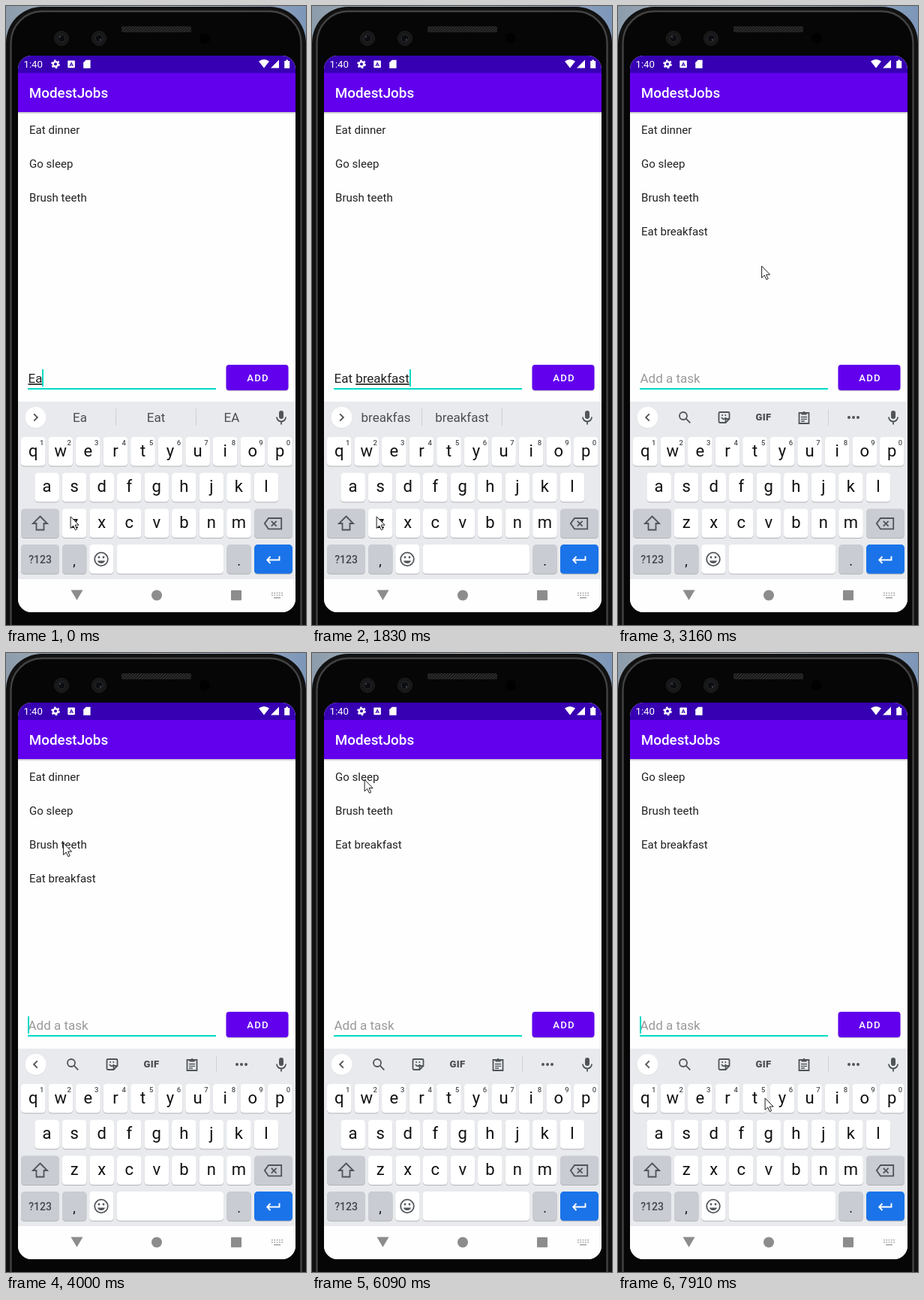
Animation of 400x823 px, one loop 8 s. Source, as an HTML page:

```html
<!DOCTYPE html>
<html lang="en">
<head>
<meta charset="utf-8">
<title>To-do list</title>
<style>
  html, body { margin: 0; width: 100%; height: 100%; overflow: hidden; background: #050505; }
  svg { display: block; width: 100vw; height: 100vh; }
  text { font-family: Roboto, sans-serif; white-space: pre; }
  .mid { text-anchor: middle; }
  .list text { font-size: 15.07px; fill: #212121; }
  .field { font-size: 17px; fill: #212121; }
  .word { text-decoration: underline #666; text-decoration-thickness: 1px; text-underline-offset: 2px; }
  .hint { fill: #9a9a9a; }
  .strip text { font-size: 17px; fill: #4a4d52; }
  .key { font-size: 22px; fill: #111; }
  .digit { font-size: 9.5px; fill: #4a4d52; font-weight: 500; }
  .line { fill: none; stroke: #505459; stroke-width: 1.8; }
</style>
</head>
<body>
<svg viewBox="0 0 400 823" preserveAspectRatio="none">
  <defs>
    <clipPath id="screen"><rect x="16" y="66" width="370" height="740" rx="18"/></clipPath>
    <linearGradient id="sky"><stop stop-color="#8d9cab"/><stop offset=".5" stop-color="#b9c3cc"/><stop offset="1" stop-color="#7d96b8"/></linearGradient>
    <linearGradient id="shade" x2="0" y2="1"><stop stop-color="#000" stop-opacity=".25"/><stop offset="1" stop-color="#000" stop-opacity="0"/></linearGradient>
    <pattern id="mesh" width="4" height="4" patternUnits="userSpaceOnUse"><rect width="4" height="4" fill="#1b1b1b"/><path d="M0 4L4 0" stroke="#383838"/></pattern>
  </defs>

  <!-- phone body -->
  <rect width="400" height="823" fill="url(#sky)"/>
  <rect x="0" y="1" width="400" height="900" rx="48" fill="#111"/>
  <rect x="6.5" y="7" width="387" height="900" rx="42" fill="#060606" stroke="#424242" stroke-width="2.4"/>
  <rect x="154" y="27" width="93" height="8" rx="2" fill="url(#mesh)"/>
  <g fill="#171717" stroke="#202020">
    <circle cx="74" cy="43" r="9.5"/><circle cx="124" cy="43" r="9.5"/>
  </g>
  <g fill="#0c0d11" stroke="#2a2c32">
    <circle cx="74" cy="43" r="5"/><circle cx="124" cy="43" r="5"/>
  </g>
  <g fill="#43464d"><circle cx="72" cy="41" r="1.2"/><circle cx="126" cy="45" r="1.2"/></g>
  <circle cx="265" cy="43" r="7" fill="#010101"/>

  <g clip-path="url(#screen)">
    <rect x="16" y="66" width="370" height="740" fill="#fefefe"/>
    <rect x="16" y="141" width="370" height="3" fill="url(#shade)"/>
    <rect x="16" y="66" width="370" height="23" fill="#3700b3"/>
    <rect x="16" y="89" width="370" height="52" fill="#6200ee"/>

    <!-- status bar -->
    <g fill="#fff">
      <text x="23.5" y="82" font-size="13.2">1:40</text>
      <circle cx="66" cy="77.3" r="3.2" fill="none" stroke="#fff" stroke-width="2.4"/>
      <circle cx="66" cy="77.3" r="5" fill="none" stroke="#fff" stroke-width="1.8" stroke-dasharray="2.6 2.636"/>
      <rect x="82.3" y="72.6" width="9.6" height="9.6" rx="1"/>
      <text class="mid" x="87.1" y="80.3" font-size="8" font-weight="700" fill="#3700b3">A</text>
      <path d="M106.6 71.8h6v11h-9.4v-7.6z"/>
      <path d="M337 73.6Q344 68.6 351 73.6L344 82.6ZM364 71.6V82.6H353ZM371.2 73h2.2v-1.5h2.6v1.5h2.2v9.8h-7z"/>
      <text x="30.7" y="122.3" font-size="18.84" font-weight="500">ModestJobs</text>
    </g>

    <g class="list" id="list"></g>

    <!-- entry row -->
    <rect x="29" y="508" width="251" height="2" fill="#03dac5"/>
    <text class="field" x="29.5" y="501"><tspan id="done"></tspan><tspan id="word" class="word"></tspan></text>
    <text class="field hint" id="hint" x="29.5" y="501">Add a task</text>
    <rect id="caret" y="483" width="2" height="23" fill="#03dac5"/>
    <rect x="293.5" y="478.3" width="83" height="34" rx="4" fill="#000" opacity=".18"/>
    <rect id="button" x="293.5" y="477" width="83" height="34" rx="4"/>
    <text class="mid" x="336" y="499.2" font-size="13.2" font-weight="500" letter-spacing="1.18" fill="#fff">ADD</text>

    <!-- keyboard -->
    <rect x="16" y="526" width="370" height="236" fill="#e8eaed"/>
    <circle cx="39.5" cy="547.5" r="14.2" fill="#000" opacity=".08"/>
    <circle cx="39.5" cy="547" r="14" fill="#fff"/>
    <path id="chevron" class="line" d="M-2.3 -4.7L2.4 0L-2.3 4.7"/>
    <rect x="364" y="538" width="6" height="11" rx="3" fill="#505459"/>
    <path class="line" d="M361 546.5a6 6 0 0 0 12 0M367 552.5v4"/>

    <g class="strip" id="words">
      <path d="M146.5 535V558M253.5 535V558" stroke="#cdd0d4"/>
      <text class="mid" x="98.5" y="553"></text>
      <text class="mid" x="200" y="553"></text>
      <text class="mid" x="301" y="553"></text>
    </g>
    <g class="strip" id="tools">
      <circle class="line" cx="87" cy="545" r="5"/>
      <path class="line" d="M90.7 548.7L96.3 554.3"/>
      <path class="line" d="M136 540h11a1.5 1.5 0 0 1 1.5 1.5V549l-5 5h-7.5a1.5 1.5 0 0 1-1.5-1.5v-11a1.5 1.5 0 0 1 1.5-1.5zM148 549h-4.5v4.5"/>
      <path class="line" d="M138 547q3 4.5 6 0M138.3 544h1.6M142.5 544h1.6"/>
      <text class="mid" x="194" y="551.4" style="font-size:13px;font-weight:900;letter-spacing:.4px">GIF</text>
      <path class="line" d="M241.5 541h13v14h-13z"/>
      <path d="M244.5 540h2a1.8 1.8 0 0 1 3.2 0h2v3.5h-7.2z" fill="#505459"/>
      <path class="line" d="M244 546.5h8M244 549.3h8M244 552h5" style="stroke-width:1.3"/>
      <path d="M280.5 536V558" stroke="#cdd0d4"/>
      <g fill="#505459"><circle cx="308" cy="547" r="2"/><circle cx="314" cy="547" r="2"/><circle cx="320" cy="547" r="2"/></g>
    </g>
    <g id="keys"></g>
    <path class="line" d="M45.5 678.5L55 688H50.5V696.5H40.5V688H36Z"/>
    <path class="line" d="M350 681H367.2V695.3H350L344.8 688.1ZM353.8 684.8l6.8 6.8M360.6 684.8l-6.8 6.8"/>
    <text class="mid" x="45.5" y="741" font-size="14" font-weight="500" fill="#43474c">?123</text>
    <text class="mid key" x="91" y="744" style="font-size:18px">,</text>
    <text class="mid key" x="310.5" y="744" style="font-size:18px">.</text>
    <circle class="line" cx="127" cy="735.5" r="8.8"/>
    <g fill="#505459"><circle cx="124" cy="733" r="1.4"/><circle cx="130" cy="733" r="1.4"/><path d="M122 737.5h10a5.3 5.3 0 0 1-10 0z"/></g>
    <path d="M364.5 731.5V736.5H348.5M352.5 732L348.2 736.5L352.5 741" fill="none" stroke="#fff" stroke-width="1.9"/>

    <!-- navigation bar -->
    <rect x="16" y="762" width="370" height="44" fill="#fefefe"/>
    <g fill="#8c8c8c">
      <path d="M86.5 776.5h16L94.5 790z"/><circle cx="201" cy="783.5" r="7"/><rect x="300" y="776.8" width="14" height="13.5" rx="1"/>
    </g>
    <g stroke="#a2a2a2" stroke-width="1.6">
      <path d="M354 780.5h15M354 783.5h15" stroke-dasharray="1.8 1.5"/>
      <path d="M357 786.8h9"/>
    </g>
  </g>

  <path id="pointer" d="M.6 .8V16.4L4.2 13L6.9 18.7L9.2 17.6L6.6 12.1H11.6Z" fill="#fff" stroke="#1c1c1c" stroke-linejoin="round"/>
</svg>
<script>
const $ = id => document.getElementById(id);
const NS = 'http://www.w3.org/2000/svg';
const LOOP = 8000;

function add(parent, tag, attrs, text = '') {
  const el = parent.appendChild(document.createElementNS(NS, tag));
  for (const name in attrs) el.setAttribute(name, attrs[name]);
  el.textContent = text;
  return el;
}

const rowY = r => 573 + 47.7 * r;

function key(x, r, w, fill) {
  const box = { x, width: w, height: 38.6, rx: 4.5 };
  add($('keys'), 'rect', { ...box, y: rowY(r) + 1, fill: '#000', opacity: .24 });
  add($('keys'), 'rect', { ...box, y: rowY(r), fill });
}

// Letter rows, then the wide and grey keys
const PITCH = 36.55;
[['qwertyuiop', 20], ['asdfghjkl', 38.3], ['zxcvbnm', 74.9]].forEach(([row, left], r) =>
  [...row].forEach((letter, i) => {
    const x = left + PITCH * i;
    key(x, r, 32.6, '#fff');
    add($('keys'), 'text', { class: 'mid key', x: x + 16.3, y: rowY(r) + 25.7 }, letter);
    if (r === 0) add($('keys'), 'text', { class: 'mid digit', x: x + 27.6, y: rowY(r) + 11 }, (i + 1) % 10);
  }));
const GREY = '#c9ccd2';
key(20, 2, 51, GREY);
key(331, 2, 51, GREY);
key(20, 3, 51, GREY);
key(75, 3, 32.4, GREY);
key(111.2, 3, 32.4, '#fff');
key(147.5, 3, 142.6, '#fff');
key(294.4, 3, 32.4, GREY);
key(331, 3, 51, '#1a73e8');

// Each track holds a value from its time until the next entry
const pointer = [
  [0, 85.5, 678],
  [2230, 112, 656], [2360, 215, 574], [2500, 298, 509], [2640, 305, 504],
  [3030, 262, 440], [3160, 191, 345], [3310, 148, 303], [3450, 112, 276],
  [3590, 88, 259], [3720, 78, 254], [4000, 76, 252],
  [4420, 75.5, 244], [4550, 74, 225], [4690, 72, 200], [4820, 70, 180], [4950, 69.5, 170], [5090, 69.5, 167.5],
  [6240, 70, 172], [6500, 79, 213], [6640, 92, 275], [6780, 107, 345], [6930, 118, 399], [7090, 124, 429],
  [7240, 138, 465], [7380, 163, 522], [7520, 184, 567], [7640, 193, 586], [7910, 195.5, 591]
];
const typed = [
  [0, '', 'Ea'], [460, '', 'Eat'], [1020, 'Eat ', 'b'], [1160, 'Eat ', 'bre'], [1290, 'Eat ', 'break'],
  [1410, 'Eat ', 'breakf'], [1550, 'Eat ', 'breakfa'], [1690, 'Eat ', 'breakfas'],
  [1830, 'Eat ', 'breakfast'], [2770, '', '']
];
const hints = [
  [0, 'Ea', 'Eat', 'EA'], [600, 'Eat', 'Eating', 'Eats'], [1160, 'b', 'be', 'by'],
  [1290, 'brea', 'breakfast', 'bread'], [1410, 'break', 'breakfast', 'breaks'],
  [1550, 'breakf', 'breakfast', ''], [1690, 'breakfa', 'breakfast', ''],
  [1830, 'breakfas', 'breakfast', ''], [1980, 'breakfast', 'breakfasts', 'breakfasting']
];
const caret = [
  [0, 1], [2360, 0], [2770, 1], [3160, 0], [3590, 1], [4140, 0], [4690, 1],
  [5220, 0], [5650, 1], [6090, 0], [6640, 1], [7090, 0], [7640, 1]
];
const button = [
  [0, '#6200ee'], [2640, '#7520ef'], [2770, '#893cf0'], [2900, '#7a25ef'], [3030, '#6a0dee'], [3160, '#6200ee']
];
const added = [[0, 0], [2770, .2], [2900, 1]];
const removed = [[0, 0], [5650, .5], [5800, 1]];
const TOOLS_AT = 2900;

const at = (track, t) => track.findLast(step => step[0] <= t).slice(1);
const show = (el, on) => el.setAttribute('visibility', on ? 'visible' : 'hidden');
const rows = ['Eat dinner', 'Go sleep', 'Brush teeth', 'Eat breakfast']
  .map(name => add($('list'), 'text', { x: 31 }, name));
const slots = [...$('words').querySelectorAll('text')];

function render(t) {
  const [x, y] = at(pointer, t);
  $('pointer').setAttribute('transform', `translate(${x} ${y})`);

  const [done, word] = at(typed, t);
  $('done').textContent = done;
  $('word').textContent = word;
  show($('hint'), !word);
  const width = word ? $('done').parentNode.getComputedTextLength() : 0;
  $('caret').setAttribute('x', Math.round(29.3 + width));
  show($('caret'), at(caret, t)[0]);
  $('button').setAttribute('fill', at(button, t)[0]);

  const [gone] = at(removed, t);
  rows.forEach((row, i) => row.setAttribute('y', 170 + 45.1 * (i && i - gone)));
  rows[0].setAttribute('opacity', gone ? 0 : 1);
  rows[3].setAttribute('opacity', at(added, t)[0]);

  const tools = t >= TOOLS_AT;
  show($('tools'), tools);
  show($('words'), !tools);
  $('chevron').setAttribute('transform', `translate(39.5 547) scale(${tools ? -1 : 1} 1)`);
  at(hints, t).forEach((text, i) => {
    slots[i].textContent = text;
    slots[i].style.fontSize = text.length > 11 ? '14.8px' : '';
  });
}

function tick() {
  render(performance.now() % LOOP);
  requestAnimationFrame(tick);
}
tick();
</script>
</body>
</html>
```
